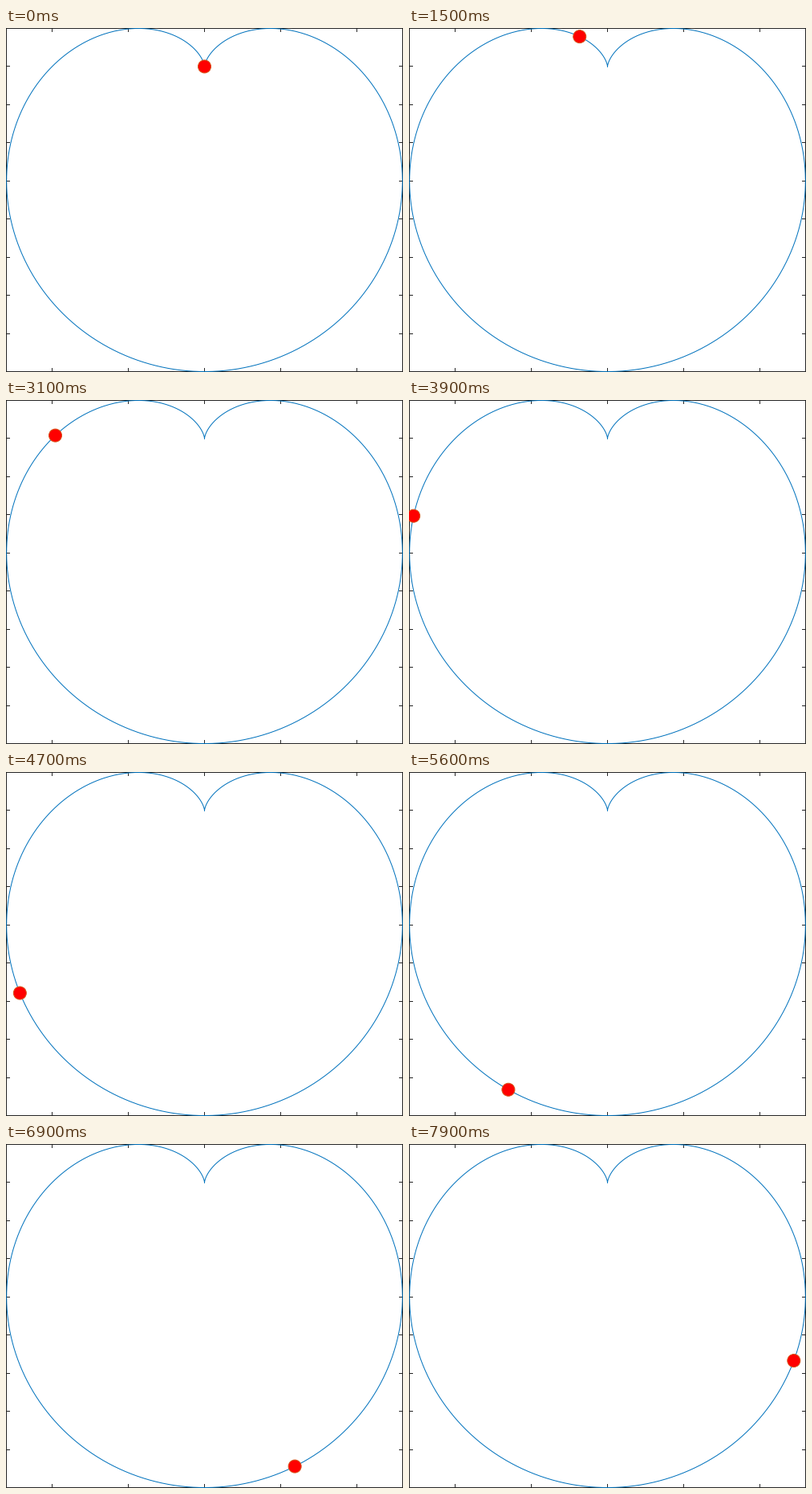
A matplotlib script for the animation above (8000 ms loop, 495 px wide and 428 px high).

```python
import numpy as np
import matplotlib.pyplot as plt
from matplotlib.animation import FuncAnimation
from matplotlib.collections import LineCollection
from matplotlib.patches import Circle

W, H, DPI = 495, 428, 100
PX = 72 / DPI              # one pixel in points
FRAMES, INTERVAL = 80, 100
STEP = 0.05                # radians per frame
SX, SY = (W - 1) / 2.6, (H - 1) / 2.25   # pixels per unit
INK = "#262626"


def to_px(x, y):
    """Data (x in -1.3..1.3, y in -2..0.25) to pixels, y down."""
    return 0.5 + (x + 1.3) * SX, 0.5 + (0.25 - y) * SY


def cardioid(t):
    r = 1 - np.cos(t)
    return to_px(-r * np.sin(t), r * np.cos(t))


def axis_lines(tick=5):
    left, right, top, bottom = 0.5, W - 0.5, 0.5, H - 0.5
    lines = [[(0, top), (W, top)], [(0, bottom), (W, bottom)],
             [(left, 0), (left, H)], [(right, 0), (right, H)]]
    for v in np.arange(-1, 1.1, 0.5):
        x = np.floor(to_px(v, 0)[0]) + 0.5
        lines += [[(x, 0), (x, tick)], [(x, H - tick), (x, H)]]
    for v in np.arange(-1.75, 0.1, 0.25):
        y = np.floor(to_px(0, v)[1]) + 0.5
        lines += [[(0, y), (tick, y)], [(W - tick, y), (W, y)]]
    return lines


fig = plt.figure(figsize=(W / DPI, H / DPI), dpi=DPI, facecolor="white")
ax = fig.add_axes([0, 0, 1, 1])
ax.set_xlim(0, W)
ax.set_ylim(H, 0)
ax.axis("off")

ax.add_collection(LineCollection(axis_lines(), colors=INK, linewidths=PX,
                                 snap=False, zorder=1), autolim=False)
ax.plot(*cardioid(np.linspace(0, 2 * np.pi, 600)), color="#0072BD",
        lw=PX, snap=False, zorder=2)
dot = Circle(cardioid(0), 8, facecolor="red", edgecolor="#D95319",
             lw=PX, snap=False, zorder=3)
ax.add_patch(dot)


def update(i):
    dot.center = cardioid(STEP * i)
    return (dot,)


anim = FuncAnimation(fig, update, frames=FRAMES, interval=INTERVAL,
                     repeat=True, repeat_delay=0, blit=False)
plt.show()
```
